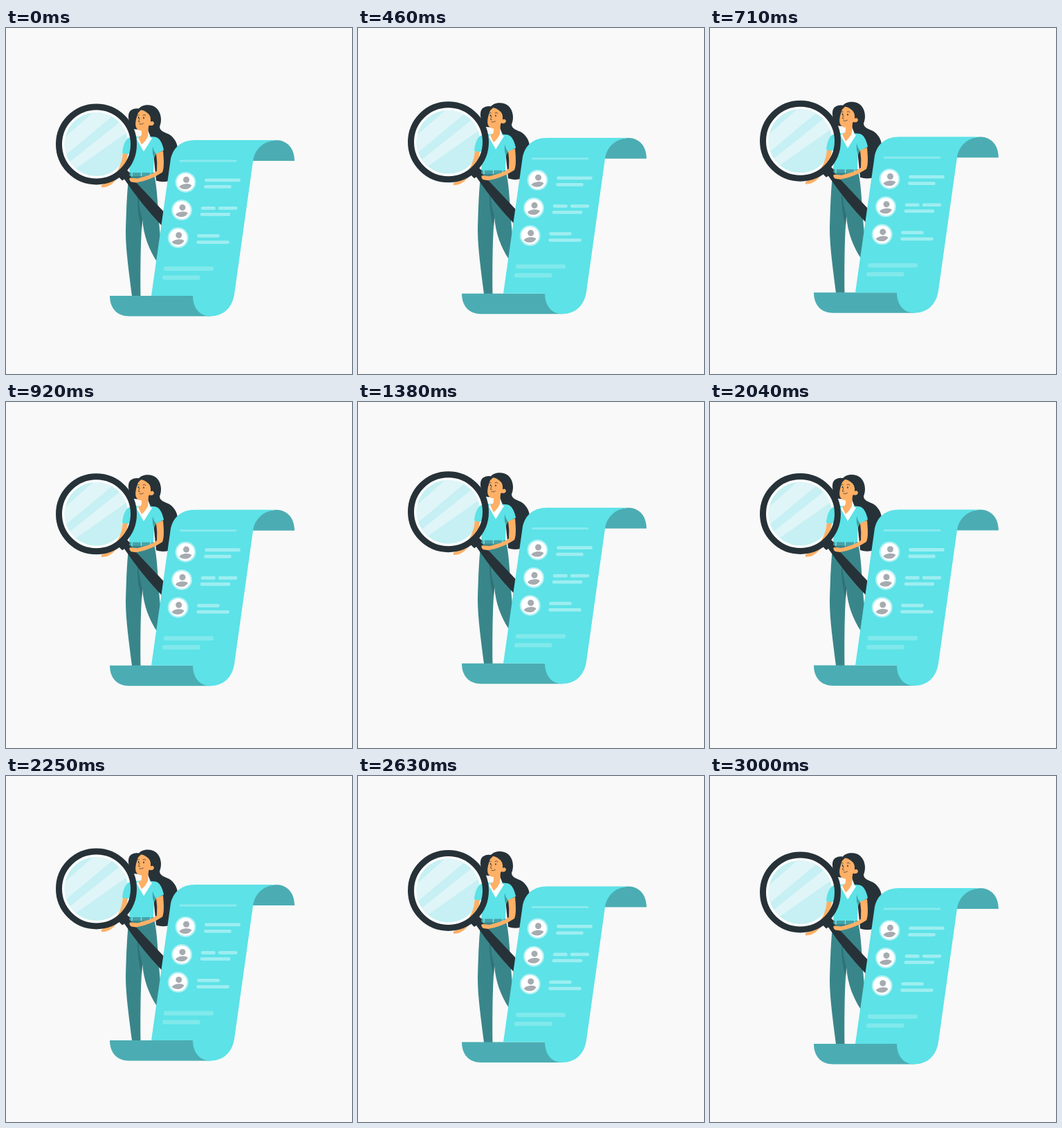
These frames come from a looping animation (500 by 500 pixels, 3040 ms). An HTML page:

```html
<!DOCTYPE html>
<html lang="en">
<head>
<meta charset="utf-8">
<title>Profile search</title>
<style>
html, body { margin: 0; width: 100%; height: 100%; overflow: hidden; background: #f9f9f9; }
svg { display: block; width: 100vw; height: 100vh; }
.ink { fill: #263238; }
.skin { fill: #ffb066; }
.cyan { fill: #5ce2e7; }
.teal { fill: #4badb3; }
.line { fill: none; stroke: #263238; stroke-width: .7; stroke-linecap: round; }
.text { fill: none; stroke: #fff; stroke-linecap: round; }
</style>
</head>
<body>
<svg viewBox="0 -.4 500 500">
  <defs>
    <clipPath id="lens"><circle cx="130.5" cy="167.5" r="46"/></clipPath>
    <g id="avatar">
      <circle r="15" fill="#fff" opacity=".5"/>
      <circle r="12.8" fill="#fff"/>
      <circle cx="1" cy="-3.7" r="4.5" fill="#a6abb0"/>
      <path d="M-9.200 6.500Q-6 2.600 0 2.300Q6 1.800 9 4.500Q5.500 10-.5 10Q-6 10-9.200 6.500Z" fill="#a6abb0"/>
    </g>
  </defs>
  <g id="scene">
    <!-- glass -->
    <circle cx="130.5" cy="167.5" r="50" fill="#fff"/>
    <g clip-path="url(#lens)">
      <path d="M80 110H190V220H80Z" fill="#c6f0f3"/>
      <path d="M70 171L130 118L180 105L78 190ZM87 197L180 123V147L96 206Z" fill="#e0f5f8"/>
    </g>

    <!-- hair -->
    <path class="ink" d="M188 146Q181 146 179 138C176 130 176 121 181 118Q186 115 192 116C197 110 210 109 217 115C224 121 226 133 222 142C222 149 230 150 237 154C245 160 249 168 248 180L240 190L234 221Q225 223 217 220L213 180L209 157L205 147Z"/>

    <!-- trousers -->
    <path d="M178 212H214C219 230 219 260 223 300L218 337C206 319 199 299 197 276C195 300 194 335 194.500 387H182C178 355 173 320 173 295C174 260 175 230 178 212Z" fill="#39868a"/>
    <path d="M191 230C188 254 192 276 196 290L197 276C193 262 191 248 191 230Z" fill="#2f7278"/>

    <!-- arm behind the lens, shirt, neck -->
    <path class="skin" d="M169 180L176 181C175 194 170 207 163 215L156 222Q150 229 139 230Q136 228 139 226L153 217Q168 200 169 180Z"/>
    <path class="cyan" d="M191 156L181 157C173 158 169 169 168 180L176 182L180 180L178 209H213L214 183L217 182L228 176C226 166 222 158 216 157L205 156Z"/>
    <path d="M212 171Q211 181 214 187L217 182Q213 177 212 171Z" fill="#429fa6"/>
    <path d="M191 156L189 160L199 178L211 159L205 155L196 167Z" fill="#fff"/>
    <path class="skin" d="M196 144L206 141L205 156Q202 163 196 168L191 158Q196 156 196 152Z"/>
    <path d="M178 208.500H214V213.500H178Z" fill="#45a4aa"/>
    <path d="M182 208V214M195.500 208V214M209 208V214" stroke="#8de6e9" stroke-width="1.300"/>

    <!-- face -->
    <path class="skin" d="M191 122C188 130 186 138 188 143Q190 148 197 148Q204 147 207 140Q213 142 214 137Q213 133 209 135Q210 126 204 122Q199 118 195 118Z"/>
    <path class="line" d="M190 126Q191 124 192.500 125.500M198 125.500Q200 123.800 202 126M193 130L191.500 135L193.500 135.500M193 138.500Q196 139.500 198.500 137.500"/>
    <ellipse class="ink" cx="191.500" cy="129" rx=".8" ry="1.300"/>
    <ellipse class="ink" cx="199" cy="129.500" rx=".8" ry="1.300"/>

    <!-- lens frame and handle -->
    <circle cx="130.500" cy="167.500" r="54" fill="none" stroke="#263238" stroke-width="9"/>
    <path class="ink" d="M163 215L175 205L179 209L178 212L228 265L225 285Q197 256 171 218L168 220Z"/>
    <path class="skin" d="M217 181L227 177C228 189 229 201 226 208C214 216 200 221 188 223L181 222Q177 219 179 216L190 217C200 214 211 212 218 206Q219 194 217 181Z"/>

    <!-- scroll -->
    <path class="teal" d="M150 386.500H273L296 416H178C160 416 150 404 150 386.500ZM356 191.500H417C417 174 407 161.500 390 161.500L362 166Z"/>
    <path class="cyan" d="M210 386.500L237.500 192C240 173 253 161.500 273 161.500H392C373 162 359.500 174 357 191.500L330 384C327 404 314 416 295 416C280 416 270 404 270 386.500Z"/>
    <path class="text" d="M252 191.500H332" stroke-width="3" opacity=".28"/>
    <path class="text" d="M289.500 219.500H336.500M288.500 229H323.500M284 260H300.500M309 260H332M283 269H322M278.500 300H306.500M277.500 309.200H320.500" stroke-width="4.800" opacity=".4"/>
    <path class="text" d="M231 347.300H297M229 360.200H277.500" stroke-width="6.400" opacity=".22"/>
    <use href="#avatar" x="259.500" y="222.500"/>
    <use href="#avatar" x="254" y="262.700"/>
    <use href="#avatar" x="248.700" y="302.700"/>
  </g>
</svg>
<script>
const LOOP = 3040, FLOAT = 3000, RISE = 10;
const scene = document.getElementById('scene');

// Constant-speed float up and down, then a short rest.
function draw() {
  const p = Math.min(1, performance.now() % LOOP / FLOAT);
  const y = -RISE * (1 - Math.abs(1 - 2 * p));
  scene.setAttribute('transform', `translate(0 ${y})`);
  requestAnimationFrame(draw);
}
draw();
</script>
</body>
</html>
```
